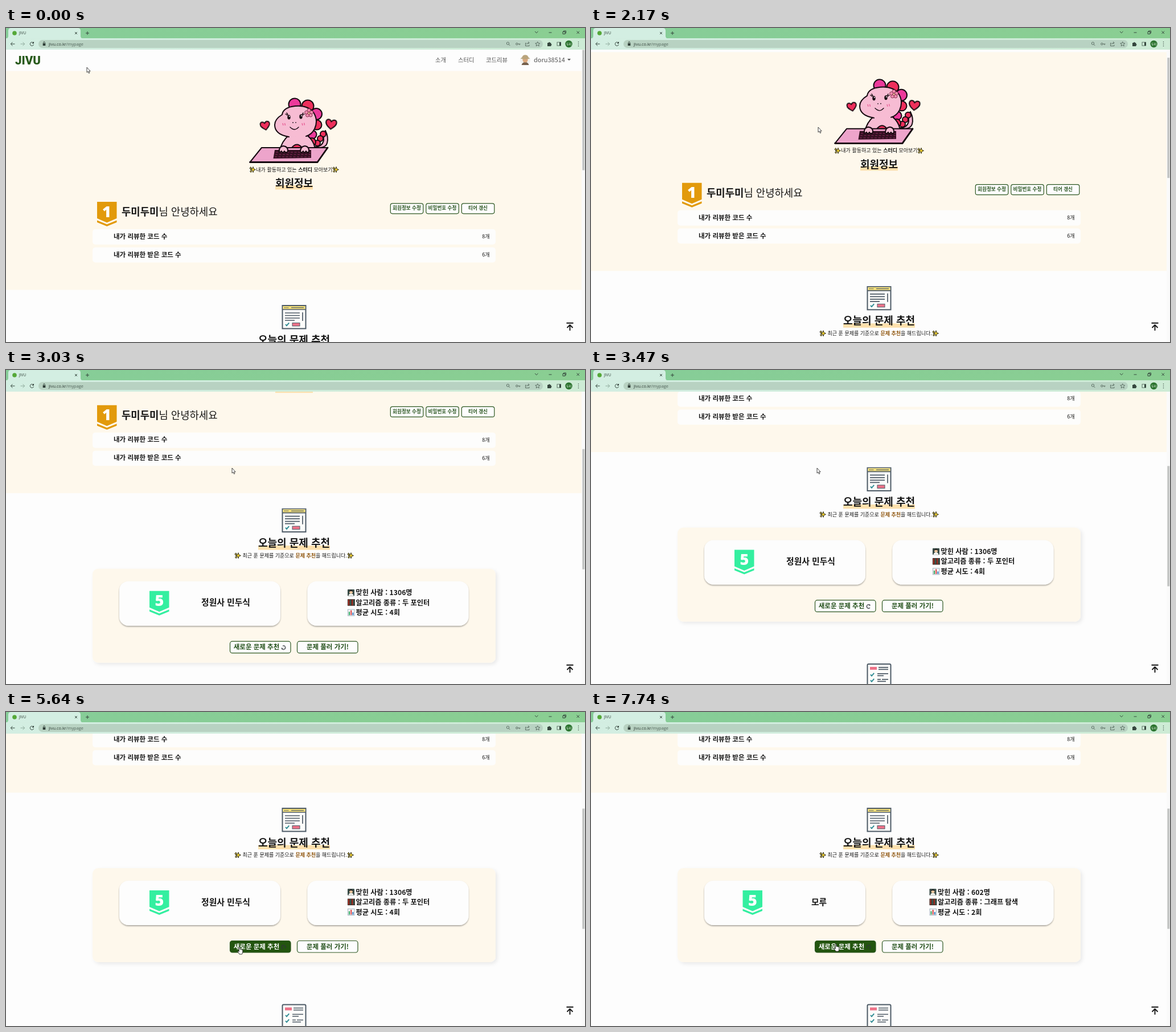
Recreate the animation shown at these times as an HTML page. Size 1017 by 551 pixels, loop 8 s.

```html
<!DOCTYPE html>
<html lang="ko">
<head>
<meta charset="utf-8">
<title>JIVU</title>
<style>
@property --s { syntax: "<number>"; inherits: true; initial-value: 0; }
html, body { margin: 0; width: 100%; height: 100%; overflow: hidden; background: #fdfdfd; }
svg { display: block; width: 100vw; height: 100vh; animation: scroll 8s linear infinite; }
text { font-family: "Noto Sans CJK KR", "Noto Sans CJK JP", sans-serif; fill: #151515; white-space: pre; }
.mid { text-anchor: middle; }
.end { text-anchor: end; }
.b { font-weight: 700; }
.m { font-weight: 500; }
.h1 { font-size: 18px; font-weight: 700; text-anchor: middle; }
.hello { font-size: 17.8px; }
.row { font-size: 11.5px; font-weight: 700; }
.sub { font-size: 9px; font-weight: 500; }
.tiny { font-size: 8.6px; font-weight: 700; fill: #2c5722; text-anchor: middle; }
.btn { font-size: 11.5px; font-weight: 700; fill: #23501a; text-anchor: middle; }
.info { font-size: 12.2px; font-weight: 700; }
.name { font-size: 14.8px; font-weight: 700; text-anchor: middle; }
.nav { font-size: 10.3px; font-weight: 500; fill: #555; }
.ui { font-family: "Open Sans", "Noto Sans", sans-serif; fill: #2c3a33; }
.tier { font: 800 27px "Open Sans", sans-serif; fill: #fff; text-anchor: middle; }
.line { fill: none; stroke: #35463d; stroke-width: 1; }
.box { fill: #fdfdfd; stroke: #2c5722; stroke-width: 1.2; }
.ink { stroke: #160a10; stroke-width: 2; stroke-linejoin: round; stroke-linecap: round; }
.slate { fill: none; stroke: #4d5a66; stroke-width: 1.7; }

#page { transform: translateY(calc(var(--s) * -1px)); }
#thumb { transform: translateY(calc(var(--s) * .412px)); }
#cursor { animation: move 8s infinite; }
#arrow, #hand, #first, #second { animation: 8s step-end infinite; }
#arrow { animation-name: toHand; }
#hand { animation-name: fromArrow; }
#first { animation-name: leave; }
#second { animation-name: enter; }
#heartL { animation: nearL .8s step-end infinite; }
#heartR { animation: nearR .8s step-end infinite; }
#spin { animation: spin 1s linear infinite; }
#newBox { animation: fillBox 8s linear infinite; }
#newText { animation: fillText 8s linear infinite; }

@keyframes scroll {
  0%, 26.1% { --s: 0; }
  27.125% { --s: 33; }
  28.6%, 34.7% { --s: 53; }
  36.25% { --s: 117; }
  37.875% { --s: 243; }
  39.4% { --s: 288; }
  43.375% { --s: 315.5; }
  44.3%, 100% { --s: 318; }
}
@keyframes move {
  0%, 10% { transform: translate(142px, 69px); animation-timing-function: ease-in-out; }
  24%, 28% { transform: translate(399px, 174px); }
  32%, 50.6% { transform: translate(397px, 172px); animation-timing-function: ease-in-out; }
  61.25%, 73.5% { transform: translate(409px, 412px); animation-timing-function: ease-in-out; }
  81%, 100% { transform: translate(429px, 407px); }
}
@keyframes toHand { 0% { visibility: visible; } 59.75%, 100% { visibility: hidden; } }
@keyframes fromArrow { 0% { visibility: hidden; } 59.75%, 100% { visibility: visible; } }
@keyframes leave { 0% { visibility: visible; } 88.5%, 100% { visibility: hidden; } }
@keyframes enter { 0% { visibility: hidden; } 88.5%, 100% { visibility: visible; } }
@keyframes nearL { 50%, 100% { transform: translateX(3px); } }
@keyframes nearR { 50%, 100% { transform: translateX(-3px); } }
@keyframes spin { to { transform: rotate(360deg); } }
@keyframes fillBox { 0%, 59.75% { fill: #fdfdfd; } 61.6%, 100% { fill: #23550f; } }
@keyframes fillText { 0%, 59.75% { fill: #23501a; } 61.6%, 100% { fill: #fff; } }
</style>
</head>
<body>
<svg viewBox="0 0 1017 551" preserveAspectRatio="none">
<defs>
  <linearGradient id="strip"><stop offset="0" stop-color="#86cd98"/><stop offset="1" stop-color="#8ace92"/></linearGradient>
  <linearGradient id="bar"><stop offset="0" stop-color="#d3eee2"/><stop offset="1" stop-color="#cdebd5"/></linearGradient>
  <filter id="soft" x="-10%" y="-20%" width="120%" height="150%"><feDropShadow dx="0" dy="1.6" stdDeviation="1.1" flood-color="#000" flood-opacity=".36"/></filter>
  <filter id="faint" x="-5%" y="-10%" width="110%" height="125%"><feDropShadow dx="3" dy="3" stdDeviation="3" flood-color="#000" flood-opacity=".08"/></filter>
  <g id="badge">
    <path d="M0 0H34.500V29L17.250 36.500L0 29Z"/>
    <path d="M0 32.500L17.250 39.500L34.500 32.500V36L17.250 43L0 36Z"/>
  </g>
  <path id="heart" d="M0 9C-5 5-10 1-9-4C-8-9-2-9 0-4C3-9 9-8 9.500-3C10 2 4 6 0 9Z"/>
  <g id="spark" fill="#f0cf2c" stroke="#26240f" stroke-width=".9">
    <path d="M1-5L2.300-1.300L5.500 0L2.300 1.300L1 5L-.300 1.300L-3.500 0L-.300-1.300Z"/>
    <path d="M-3.200-4.800L-2.500-3L-1-2.500L-2.500-1.900L-3.200 0L-3.900-1.900L-5.300-2.500L-3.900-3ZM-2.800 1L-2.200 2.400L-1 3L-2.200 3.500L-2.800 5L-3.400 3.500L-4.600 3L-3.400 2.400Z"/>
  </g>
  <path id="tick" d="M-3 0L-1 2.300L3.200-2.600" fill="none" stroke="#2c8a92" stroke-width="1.900"/>
  <g id="marks">
    <rect width="12" height="11.500" y="-5.700" rx="1" fill="#384b46"/>
    <path d="M1.500 5.500Q2 1.500 6 1.500T10.500 5.500Z" fill="#f4f4f0"/><circle cx="6" cy="-1.200" r="3" fill="#f0c9a0"/><path d="M3-1.500Q3-5 6-5T9-1.500L6-3Z" fill="#222"/>
    <rect y="11.600" width="13" height="11.500" fill="#3b2620"/>
    <path d="M2 12.500v9.500M8.300 12.500v9.500" stroke="#b63a2e" stroke-width="1.800"/><path d="M5.200 12.500v9.500M11.300 12.500v9.500" stroke="#376f68" stroke-width="1.600"/>
    <rect x=".5" y="29.500" width="11.500" height="11" fill="#f4f8fa" stroke="#8fa4b0" stroke-width=".8"/>
    <path d="M3 39.500v-6" stroke="#36a25a" stroke-width="2"/><path d="M6.200 39.500v-8.500" stroke="#d83d3d" stroke-width="2"/><path d="M9.400 39.500v-4.500" stroke="#2f78c4" stroke-width="2"/>
  </g>
</defs>

<g id="page">
  <rect width="1017" height="1000" fill="#fdfdfd"/>
  <rect y="75.500" width="1011" height="384" fill="#fef8ec"/>

  <!-- header -->
  <text x="16" y="64" style="font:900 20.500px Roboto,sans-serif;fill:#285a1c">JIVU</text>
  <text class="nav" x="754" y="59.800">소개</text>
  <text class="nav" x="794" y="59.800">스터디</text>
  <text class="nav" x="843" y="59.800">코드리뷰</text>
  <circle cx="912" cy="56.500" r="9" fill="#f1f1ee"/>
  <path d="M905.500 65Q907 60 912 60T918.500 65Z" fill="#75604c"/>
  <circle cx="912" cy="56" r="4.600" fill="#dba87d"/>
  <path d="M903.500 53.500Q907 52 908 48.500Q912 46 916 48.500Q917 52 920.500 53.500Q912 56 903.500 53.500Z" fill="#b9a47c"/>
  <text x="927" y="60" style="font-size:11px;fill:#555">doru38514</text>
  <path d="M986 54h6l-3 3.200z" fill="#555"/>

  <!-- mascot -->
  <g class="ink">
    <path d="M536 208Q555 211 558 197Q557 188 561 180Q567 192 564 202Q562 209 552 210Z" fill="#f4b3cf"/>
    <circle cx="557" cy="186" r="5" fill="#ee2f5c"/><circle cx="552" cy="194" r="5" fill="#ee2f5c"/><circle cx="547" cy="202" r="5" fill="#ee2f5c"/>
    <circle cx="507" cy="134" r="10.500" fill="#ec3a9b"/><circle cx="530" cy="137" r="10.500" fill="#ee2f5c"/>
    <circle cx="545" cy="151" r="10" fill="#ec3a9b"/><circle cx="546" cy="170" r="8.500" fill="#ee2f5c"/>
    <circle cx="538" cy="187" r="7.500" fill="#ec3a9b"/><circle cx="537" cy="200" r="7" fill="#ee2f5c"/>
    <path d="M497 188Q484 199 481 215H543Q542 198 528 188" fill="#f7bcd3"/>
    <path d="M497 191Q472 187 472 170Q472 160 485 152Q487 139 508 137Q530 135 540 148Q549 162 542 177Q537 187 527 190" fill="#f7bcd3"/>
    <path d="M502 210Q511 199 520 210Z" fill="#ee2f5c"/>
    <path d="M449 210H565L547 235.500H428.500Z" fill="#eda4cb"/>
    <path d="M428.500 235.500H547L565 210" fill="none" stroke-width="2.800"/>
  </g>
  <path d="M472 214H536V228L469.500 229Z" fill="#321020"/>
  <path d="M474 218H535M473 222H535M472 226H535" stroke="#8a2b5c" stroke-width="1" stroke-dasharray="4 2.500"/>
  <g class="ink" fill="#f7bcd3">
    <path d="M480 217Q479 208 487 207Q496 208 495 217Q491 220 489 216Q486 221 484 216Q481 219 480 217Z"/>
    <path d="M517 217Q517 208 525 207Q533 208 532 217Q529 220 527 216Q524 221 522 216Q519 220 517 217Z"/>
  </g>
  <g fill="#160a10"><ellipse cx="497" cy="156.500" rx="2.700" ry="4"/><ellipse cx="518" cy="155.500" rx="2.700" ry="4"/><circle cx="504" cy="166" r=".9"/><circle cx="509" cy="165.800" r=".9"/></g>
  <circle cx="497.800" cy="155" r="1" fill="#fff"/><circle cx="518.800" cy="154" r="1" fill="#fff"/>
  <path d="M494 153l-3-2M495 152l-2-3M520 152l2-3M521 153l3-2M499 174Q507 182 514 174" fill="none" stroke="#160a10" stroke-width="1.400" stroke-linecap="round"/>
  <path d="M486 167l1 4M489.500 167l1 4M520 167l1 4M523.500 166.500l1 4" stroke="#e85a94" stroke-width="1.300"/>
  <g fill="#f28bae" stroke="#7c2b4b" stroke-width=".9"><circle cx="532" cy="144.500" r="3"/><circle cx="536.500" cy="148" r="3"/><circle cx="535" cy="153" r="3"/><circle cx="529.500" cy="153" r="3"/><circle cx="527.700" cy="148" r="3"/><circle cx="532" cy="149.500" r="2" fill="#f8cf9f"/></g>
  <g class="ink" fill="#ee2f5c">
    <g id="heartL"><use href="#heart" transform="translate(455 171) rotate(-12) scale(.88)"/></g>
    <g id="heartR"><use href="#heart" transform="translate(571 168.500) rotate(5)"/></g>
  </g>

  <!-- member info -->
  <use href="#spark" x="433" y="248.500"/><use href="#spark" x="579" y="248.500"/>
  <text class="sub mid" x="506.500" y="251.600">내가 활동하고 있는 <tspan class="b">스터디</tspan> 모아보기</text>
  <rect x="473" y="276" width="66" height="7.500" fill="#fde0ad"/>
  <text class="h1" x="506" y="279">회원정보</text>
  <use href="#badge" x="160" y="305" fill="#e29a0c"/>
  <text class="tier" x="177" y="331.500">1</text>
  <text class="hello" x="203" y="329"><tspan class="b">두미두미</tspan>님 안녕하세요</text>
  <rect class="box" x="675.300" y="307.800" width="57.500" height="18" rx="3.500"/><text class="tiny" x="704" y="319.300">회원정보 수정</text>
  <rect class="box" x="737.800" y="307.800" width="57.500" height="18" rx="3.500"/><text class="tiny" x="766.500" y="319.300">비밀번호 수정</text>
  <rect class="box" x="800.300" y="307.800" width="57.500" height="18" rx="3.500"/><text class="tiny" x="829" y="319.300">티어 갱신</text>
  <rect x="152" y="353" width="708" height="27" rx="5" fill="#fdfdfc"/>
  <rect x="152" y="385" width="708" height="26.500" rx="5" fill="#fdfdfc"/>
  <text class="row" x="189" y="369.700">내가 리뷰한 코드 수</text><text class="sub end" x="849.500" y="369">8개</text>
  <text class="row" x="189" y="401.700">내가 리뷰한 받은 코드 수</text><text class="sub end" x="849.500" y="401">6개</text>

  <!-- recommendation -->
  <rect x="152" y="592" width="708" height="165" rx="10" fill="#fef8ec" filter="url(#faint)"/>
  <rect x="485.500" y="487" width="41" height="40.500" fill="#fcfcfa" stroke="#4d5a66" stroke-width="2"/>
  <rect x="486.500" y="488" width="39" height="5.500" fill="#f4df78"/>
  <path class="slate" d="M486 494H526M490 500H516M490 504.500H516M490 509H516M490 513H507M521 499V514"/>
  <path d="M489 490.700h7" stroke="#4d5a66" stroke-width="1.500" stroke-dasharray="1.500 1.200"/><path d="M501 490.700h22" stroke="#4d5a66" stroke-width="1.200"/>
  <use href="#tick" x="494" y="520"/>
  <rect x="503" y="517.500" width="13" height="5.500" fill="#ee7288" stroke="#4d5a66"/>
  <rect x="443" y="551.500" width="126" height="7.500" fill="#fde0ad"/>
  <text class="h1" x="506" y="553.600">오늘의 문제 추천</text>
  <use href="#spark" x="407" y="569"/><use href="#spark" x="605" y="569"/>
  <text class="sub" x="415.500" y="572.300">최근 푼 문제를 기준으로 <tspan class="b" fill="#925a14">문제 추천</tspan>을 해드립니다.</text>
  <g fill="#fdfdfd" filter="url(#soft)"><rect x="199" y="614" width="283" height="78" rx="16"/><rect x="529.500" y="614" width="283" height="78" rx="16"/></g>
  <g id="first">
    <use href="#badge" x="252" y="631" fill="#34efa0"/><text class="tier" x="269.300" y="657.500">5</text>
    <text class="name" x="386" y="656.500">정원사 민두식</text>
    <use href="#marks" x="600" y="634"/>
    <text class="info" x="614.500" y="638.500">맞힌 사람 : 1306명</text>
    <text class="info" x="614.500" y="656">알고리즘 종류 : 두 포인터</text>
    <text class="info" x="614.500" y="673.500">평균 시도 : 4회</text>
  </g>
  <g id="second">
    <use href="#badge" x="266.500" y="631" fill="#34efa0"/><text class="tier" x="283.800" y="657.500">5</text>
    <text class="name" x="400.500" y="656.500">모루</text>
    <use href="#marks" x="594.500" y="634"/>
    <text class="info" x="609" y="638.500">맞힌 사람 : 602명</text>
    <text class="info" x="609" y="656">알고리즘 종류 : 그래프 탐색</text>
    <text class="info" x="609" y="673.500">평균 시도 : 2회</text>
  </g>
  <rect id="newBox" class="box" x="393.500" y="719.500" width="106.500" height="20.500" rx="4"/>
  <text id="newText" class="btn" x="440" y="733.700">새로운 문제 추천</text>
  <g transform="translate(487.500 730.500)"><g id="spin"><path d="M-2-2.500A3.200 3.200 0 1 1-2 2.500" fill="none" stroke="#30343a" stroke-width="1.200"/><path d="M-3.600 .8L-.800 1.600L-2.900 3.800Z" fill="#30343a"/></g></g>
  <rect class="box" x="511.500" y="719.500" width="106.500" height="20.500" rx="4"/>
  <text class="btn" x="565" y="733.700">문제 풀러 가기!</text>

  <rect x="485.500" y="831.500" width="41" height="50" rx="2" fill="#fcfcfa" stroke="#4d5a66" stroke-width="2"/>
  <rect x="490" y="836.500" width="12" height="5" fill="#ee7288"/>
  <path class="slate" d="M505 837.500H522M505 841H522M503 848.500H522M503 852H514M503 858.500H509M511 858.500H522M503 862H518"/>
  <use href="#tick" x="494" y="850"/><use href="#tick" x="494" y="860"/>
</g>

<!-- scrollbar and top button -->
<rect x="1011" y="38" width="6" height="513" fill="#fafafa"/>
<rect id="thumb" x="1012.300" y="38.500" width="4" height="211" fill="#c3c5c4"/>
<path d="M984.500 517.800H996.500M990.500 531V521M985.500 526L990.500 521L995.500 526" fill="none" stroke="#141414" stroke-width="1.900"/>

<!-- browser frame -->
<rect width="1017" height="18.500" fill="url(#strip)"/>
<rect y="18" width="1017" height="20" fill="url(#bar)"/>
<path d="M0 18.500Q4 18 4 14V5Q4 0 9 0H126Q131 0 131 5V14Q131 18 135 18.500Z" fill="#d3eee2"/>
<circle cx="15" cy="9" r="3.800" fill="#55a838"/>
<text class="ui" x="23" y="11.300" font-size="6.500">JIVU</text>
<path class="line" d="M121 7l4 4M125 7l-4 4M140 9h6M143 6v6M929 6l2.700 2.700L934.500 6M953.500 8h5M978 6.500h4v4h-4zM979.500 6.500v-1.500h4v4h-1.500M1002.500 5.500l4.500 4.500M1007 5.500l-4.500 4.500"/>
<rect x="57" y="21" width="886" height="14" rx="7" fill="#b8d2c2"/>
<path class="line" d="M15.500 28H8.500M11.500 24.800L8.300 28L11.500 31.200M48 26A3.200 3.200 0 1 0 48.600 29"/>
<path d="M49 23.800v3.500h-3.500z" fill="#2f3d36"/>
<path d="M25.500 28H32.500M29.500 24.800L32.700 28L29.500 31.200" fill="none" stroke="#8ea99b"/>
<rect x="64.700" y="27" width="4.600" height="4" fill="#2f3d36"/><path class="line" d="M65.700 27V25.500a1.300 1.300 0 0 1 2.600 0V27"/>
<text class="ui" x="75" y="30.500" font-size="7.400">jivu.co.kr<tspan fill="#52655b">/mypage</tspan></text>
<g fill="none" stroke="#53665b" stroke-width=".9">
  <circle cx="881.500" cy="27" r="2.200"/><path d="M883 28.700l2.300 2.300"/>
  <circle cx="897.300" cy="28" r="1.700"/><path d="M899 28h4.500M902 28v2"/>
  <path d="M914 26.500h-1.500v5h6.500v-2M914.500 29Q915 26 918.500 26M917 24l2.200 2L917 28"/>
  <path d="M933.700 24l1.200 2.700 2.900.2-2.200 1.900.7 2.900-2.600-1.600-2.500 1.600.7-2.900-2.200-1.900 2.900-.2z"/>
  <rect x="968" y="25" width="6.500" height="6"/>
</g>
<path d="M951 26h2a1.300 1.300 0 1 1 2.600 0h1.700v2a1.200 1.200 0 1 1 0 2.400v1.600h-6.300z" fill="#35463d"/>
<rect x="972" y="25" width="2.800" height="6" fill="#35463d"/>
<circle cx="988.500" cy="28" r="6.200" fill="#2c742f"/>
<text class="mid" x="988.500" y="30" style="font-size:5px;fill:#fff">두미</text>
<path d="M1005.500 24.500h.01M1005.500 28h.01M1005.500 31.500h.01" stroke="#35463d" stroke-width="1.500" stroke-linecap="round"/>

<g id="cursor">
  <path id="arrow" d="M0 0V9L2 7.300L3.500 10.500L4.900 9.800L3.500 6.800H6.200Z" fill="#fff" stroke="#333" stroke-width=".9"/>
  <path id="hand" d="M.2 1Q.2 0 1.100 0T2 1V4.500Q3 4 3.700 4.800Q4.700 4.400 5.200 5.200Q6.800 5 6.800 6.500V9Q6.800 11 5.500 13H1Q0 11-1.800 9Q-2.500 7.700-1.400 7.500Q-.500 7.500.2 8.500Z" fill="#fff" stroke="#222" stroke-width=".9"/>
</g>
</svg>
</body>
</html>
```
